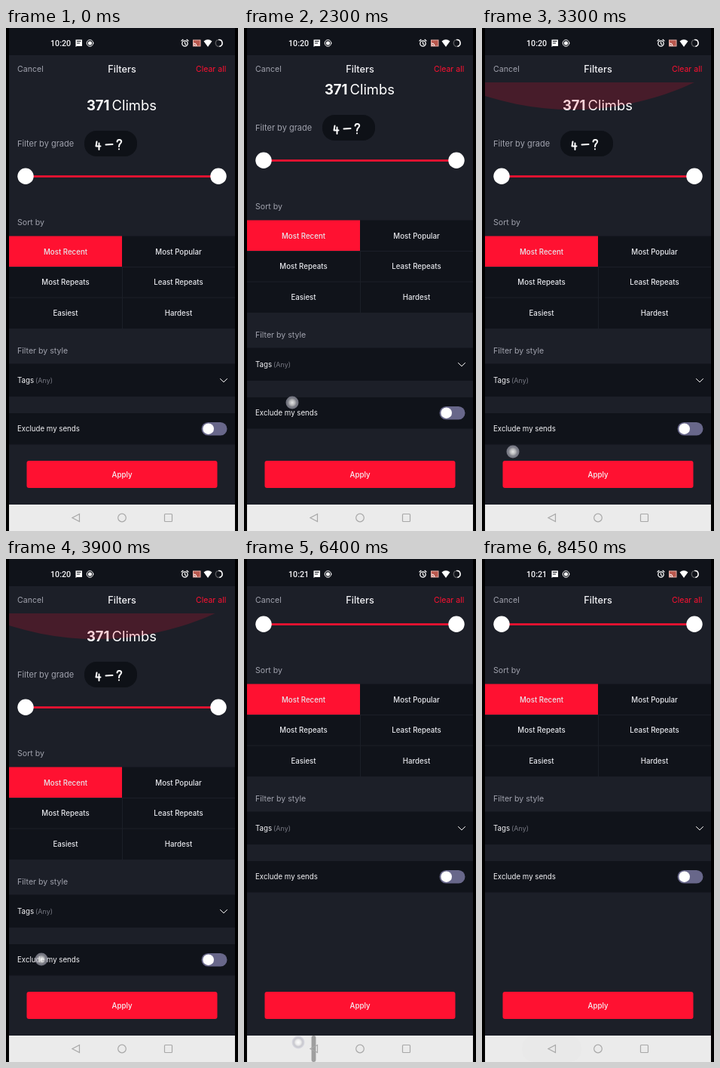
Animation of 308x666 px, one loop 8.5 s. Source, as an HTML page:

```html
<!DOCTYPE html>
<html lang="en">
<head>
<meta charset="utf-8">
<title>Filters</title>
<style>
  html, body { margin: 0; width: 100%; height: 100%; overflow: hidden; background: #000; }
  svg { display: block; width: 308px; height: 666px; }
  text { font-family: Inter, Roboto, sans-serif; font-size: 9.7px; fill: #f4f4f7; }
  .mid { text-anchor: middle; }
  .cell { font-weight: 500; fill: #e6e7ec; }
  .label { font-size: 10.6px; fill: #a0a2ad; }
  .title { font-size: 18.4px; fill: #fff; }
  .dark { fill: #10131a; }
  .red { fill: #ff1131; }
  .line { fill: none; stroke: #fff; stroke-linecap: round; stroke-linejoin: round; }
</style>
</head>
<body>
<svg viewBox="0 0 308 666">
  <defs>
    <clipPath id="view"><rect x="4" y="72" width="300" height="559"/></clipPath>
    <clipPath id="navClip"><rect x="4" y="631" width="300" height="35"/></clipPath>
    <radialGradient id="dot">
      <stop offset="0" stop-color="#fff" stop-opacity=".88"/>
      <stop offset=".4" stop-color="#eee" stop-opacity=".75"/>
      <stop offset=".7" stop-color="#b4b4be" stop-opacity=".65"/>
      <stop offset="1" stop-color="#c8c8d8" stop-opacity=".5"/>
    </radialGradient>
  </defs>
  <rect width="308" height="666"/>
  <rect class="dark" x="4" width="300" height="36"/>
  <rect x="4" y="36" width="300" height="595" fill="#1c1f28"/>

  <g clip-path="url(#view)">
    <g id="content">
      <text class="title" x="107" y="108.500" font-weight="700">371</text>
      <text class="title" x="140.500" y="108.500">Climbs</text>

      <text class="label" x="15" y="156.500" style="font-size:11px">Filter by grade</text>
      <rect x="104" y="136" width="70" height="34" rx="16" fill="#0e1117"/>
      <path class="line" stroke-width="2" d="M120.500 150.500L119.500 156.500H125.500M123.500 152.500V161M132.500 154.500L141.500 154M147.500 150.500Q148 147.500 151 148Q154.500 149 152.500 152Q150 154 150 157M150 160.200V160.500"/>

      <rect class="red" x="26" y="195.200" width="256" height="2.600"/>
      <circle cx="26" cy="196.300" r="10.700" fill="#fff"/>
      <circle cx="282" cy="196.300" r="10.700" fill="#fff"/>

      <text class="label" x="15" y="261">Sort by</text>
      <g id="grid"></g>

      <text class="label" x="15" y="431">Filter by style</text>
      <rect class="dark" x="4" y="444.500" width="300" height="43.500"/>
      <text x="15" y="470">Tags</text>
      <text x="39" y="470" style="font-size:9px;fill:#777983">(Any)</text>
      <path class="line" d="M284.500 464.500L289 468.800L293.500 464.500"/>

      <rect class="dark" x="4" y="510" width="300" height="41.500"/>
      <text x="15" y="534">Exclude my sends</text>
      <rect x="259.500" y="522" width="34" height="17.500" rx="8.750" fill="#68678a"/>
      <circle cx="268.700" cy="530.700" r="7.300" fill="#fff"/>
    </g>
    <circle id="glow" cx="120" r="382" fill="#ff1131"/>
  </g>

  <text class="label" x="15" y="57.500">Cancel</text>
  <text class="mid" x="154" y="58.500" style="font-size:12.7px;font-weight:500">Filters</text>
  <text x="252" y="57.500" style="font-size:10.5px;fill:#ff1131">Clear all</text>

  <rect class="red" x="27.500" y="573" width="253" height="36" rx="3"/>
  <text class="mid" x="154" y="594.700" font-weight="500">Apply</text>

  <!-- status bar -->
  <text id="clock" x="59" y="24" style="font-family:Roboto,sans-serif;font-size:10.700px;font-weight:500"></text>
  <path d="M92.500 15.500H101V24H94L92.500 25Z" fill="#fff"/>
  <path d="M94 17.500H99.500M94 20H98" stroke="#10131a"/>
  <circle class="line" cx="111.500" cy="20" r="4.300"/>
  <circle cx="111.500" cy="20" r="2.600" fill="#fff"/>
  <circle class="line" cx="237.500" cy="20.500" r="3.700" stroke-width="1.300"/>
  <path class="line" stroke-width="1.200" d="M237.500 18.500V20.800L239 22M233 17L235 15.300M242 17L240 15.300"/>
  <rect x="248.500" y="16" width="9.500" height="8" fill="#b9574d" stroke="#e8b0a8"/>
  <path d="M249 20Q253 20 253 24M249 22Q251 22 251 24" fill="none" stroke="#fff"/>
  <path d="M262.500 17.500Q268 13 273.500 17.500L268 25Z" fill="#fff"/>
  <circle cx="282.700" cy="20" r="4.400" fill="none" stroke="#55565a" stroke-width="1.500"/>
  <path class="line" stroke-width="1.500" d="M282.700 15.600A4.400 4.400 0 0 1 284 24.200"/>

  <!-- navigation bar -->
  <g clip-path="url(#navClip)">
    <rect x="4" y="631" width="300" height="35" fill="#ebebeb"/>
    <rect id="ripple" y="631" height="35"/>
  </g>
  <g fill="none" stroke="#a8a8a8" stroke-width="1.200">
    <path d="M97.500 643.500V653.500L88 648.500Z"/>
    <circle cx="154" cy="648.500" r="5.300"/>
    <rect x="210.500" y="643.500" width="10" height="10" rx="1"/>
  </g>
  <circle id="touch" r="8.500" fill="url(#dot)"/>
</svg>
<script>
const LOOP = 8500, STEP = 50;
const el = id => document.getElementById(id);
const set = (id, attrs) => {
  for (const key in attrs) el(id).setAttribute(key, attrs[key]);
};

const cells = ['Most Recent', 'Most Popular', 'Most Repeats', 'Least Repeats', 'Easiest', 'Hardest'];
el('grid').innerHTML = cells.map((name, i) => {
  const x = 4 + (i % 2) * 150, y = 275.5 + (i >> 1) * 40.8;
  return `<rect class="${i ? 'dark' : 'red'}" x="${x}" y="${y}" width="150" height="40.8"/>
    <text class="mid cell" x="${x + 75}" y="${y + 24}">${name}</text>`;
}).join('') +
  '<path d="M154.5 316V398M4 316.500H304M4 357H304" stroke="#1e212a" stroke-width=".9"/>';

// progress from 0 to 1 between two times, then plain, eased, and there-and-back
const ramp = (t, from, to) => Math.min(1, Math.max(0, (t - from) / (to - from)));
const ease = (t, from, to) => (1 - Math.cos(Math.PI * ramp(t, from, to))) / 2;
const hump = (t, from, to) => Math.sin(Math.PI * ramp(t, from, to));

function draw(now) {
  const t = Math.floor(now % LOOP / STEP) * STEP;

  const fling = 110 * ease(t, 4000, 4400);
  const scroll = 10 * hump(t, 400, 2000) + 21 * hump(t, 2000, 2600) + fling;
  set('content', { transform: `translate(0 ${-scroll})` });

  const pull = ease(t, 2900, 3250), release = ease(t, 4000, 4200);
  const depth = 36 * pull - 2 * ramp(t, 3300, 3900);
  set('glow', { cy: 72 + depth - 382, opacity: .19 * pull * (1 - release) });

  const spread = ramp(t, 6380, 6650), fade = ramp(t, 7450, 8350);
  const width = 79 * spread;
  set('ripple', {
    x: 92.5 - width / 2, width, rx: Math.min(width / 2, 15),
    opacity: (.34 - .22 * spread) * (1 - .93 * fade)
  });

  const down = ease(t, 1200, 2300), left = ease(t, 2300, 3300), back = ease(t, 3300, 3900);
  const dragging = t >= 400 && t < 4250, pressing = t >= 6350 && t < 7450;
  set('touch', {
    cx: pressing ? 72 : 49 + 15 * down - 23 * left + 6 * back,
    cy: pressing ? 640 : 310 + 186 * down + 65 * left - 31 * back - fling,
    opacity: dragging || pressing ? 1 : 0
  });

  el('clock').textContent = t < 4200 ? '10:20' : '10:21';
}

function tick() {
  draw(performance.now());
  requestAnimationFrame(tick);
}
tick();
</script>
</body>
</html>
```
